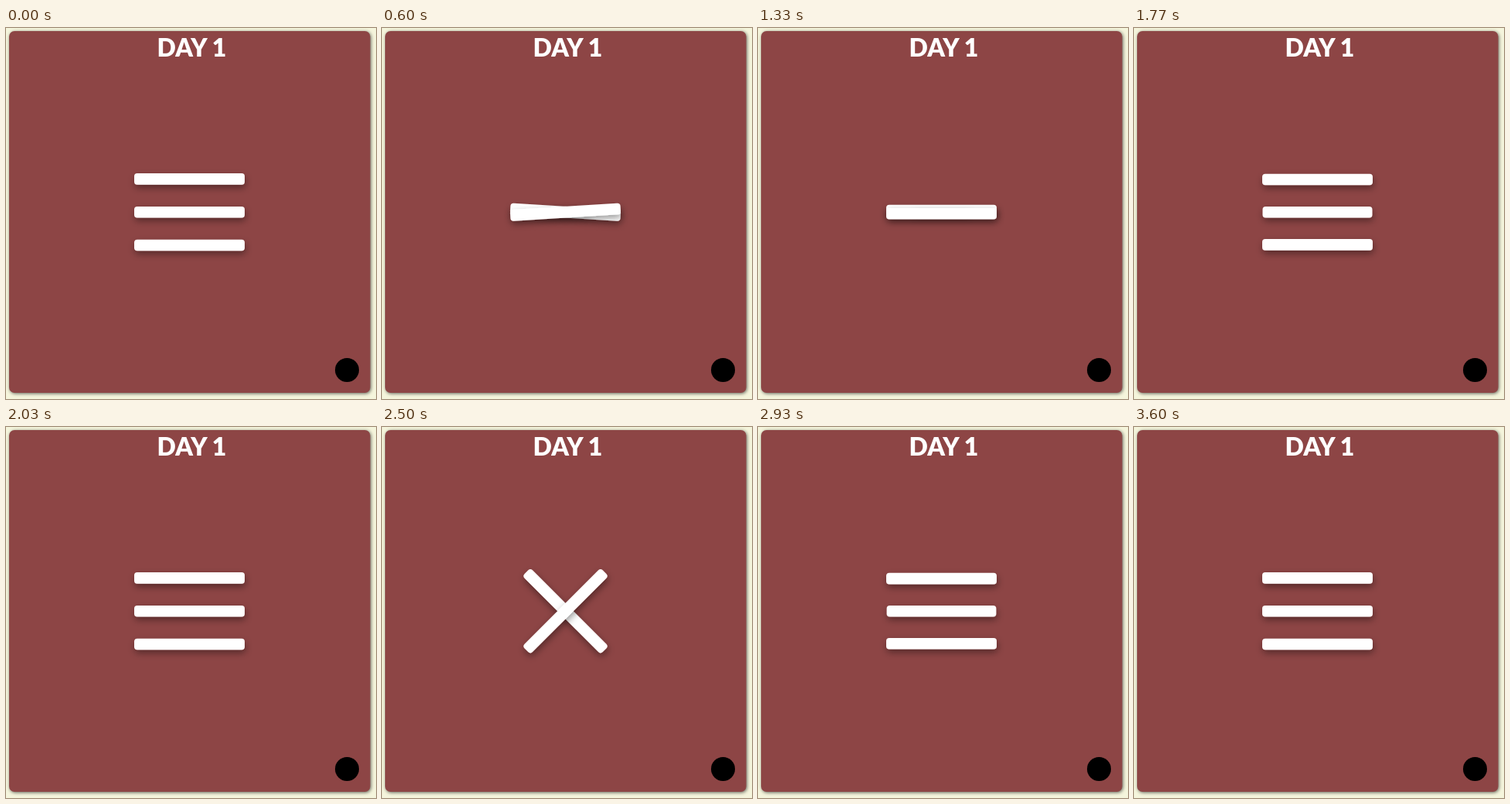
An HTML page for the animation above (4160 ms loop, 479 by 480 pixels).

```html
<!DOCTYPE html>
<html lang="en">
<head>
<meta charset="utf-8">
<title>Day 1</title>
<style>
  html, body { margin: 0; width: 100%; height: 100%; overflow: hidden; background: #f5f5dc; }
  svg { display: block; width: 100%; height: 100%; }
  .panel { fill: #8d4545; filter: drop-shadow(1px 1px 2px rgba(0, 0, 0, .6)); }
  .title { font: 900 32px Lato, sans-serif; fill: #fff; text-anchor: middle; }
  .bar rect { fill: #fff; }
</style>
</head>
<body>
<svg viewBox="0 0 479 480">
  <defs>
    <filter id="shade" filterUnits="userSpaceOnUse" x="100" y="120" width="280" height="240">
      <feDropShadow dx="1" dy="4" stdDeviation="5" flood-color="#000" flood-opacity=".4"/>
    </filter>
  </defs>
  <rect class="panel" x="4" y="4" width="467.5" height="468" rx="7"/>
  <text class="title" x="240.5" y="37">DAY 1</text>
  <circle cx="441.5" cy="442.5" r="15.5"/>
  <g class="bar" filter="url(#shade)"><rect x="-71.5" y="-7.3" width="143" height="14.6" rx="4"/></g>
  <g class="bar" filter="url(#shade)"><rect x="-71.5" y="-7.3" width="143" height="14.6" rx="4"/></g>
  <g class="bar" filter="url(#shade)"><rect x="-71.5" y="-7.3" width="143" height="14.6" rx="4"/></g>
</svg>
<script>
const LOOP = 4160, ROUND = 1800, END = 3600;
const CROSS_TIMES = [700, 1500];
const CX = 237.5, CY = 238.2, GAP = 42.8;
const [top1, mid, low] = document.querySelectorAll('.bar rect');

// Eased progress from a to b
function ease(t, a, b) {
  const x = Math.min(1, Math.max(0, (t - a) / (b - a)));
  return (1 - Math.cos(Math.PI * x)) / 2;
}

// Bars gather and then turn; closing runs the other way, faster
function pose(t) {
  let gather = 0, turn = 0;
  if (t < END) {
    for (const c of CROSS_TIMES) {
      const u = t % ROUND - c;
      gather += u < 0 ? ease(u, -391, -132) : 1 - ease(u, 90, 286);
      turn += u < 0 ? ease(u, -121, 0) : 1 - ease(u, 0, 90);
    }
  }
  return { gather, turn };
}

function place(bar, dy, angle, scale = 1) {
  bar.setAttribute('transform',
    `translate(${CX} ${CY + dy}) rotate(${angle}) scale(${scale})`);
}

function draw(t) {
  const { gather, turn } = pose(t);
  const dy = GAP * (1 - gather), hide = (gather + turn) / 2;
  place(top1, -dy, 45 * turn);
  place(mid, 0, 0, 1 - hide);
  mid.setAttribute('opacity', 1 - hide);
  place(low, dy, -45 * turn);
}

const start = performance.now();
function tick() {
  draw((performance.now() - start) % LOOP);
  requestAnimationFrame(tick);
}
tick();
</script>
</body>
</html>
```
